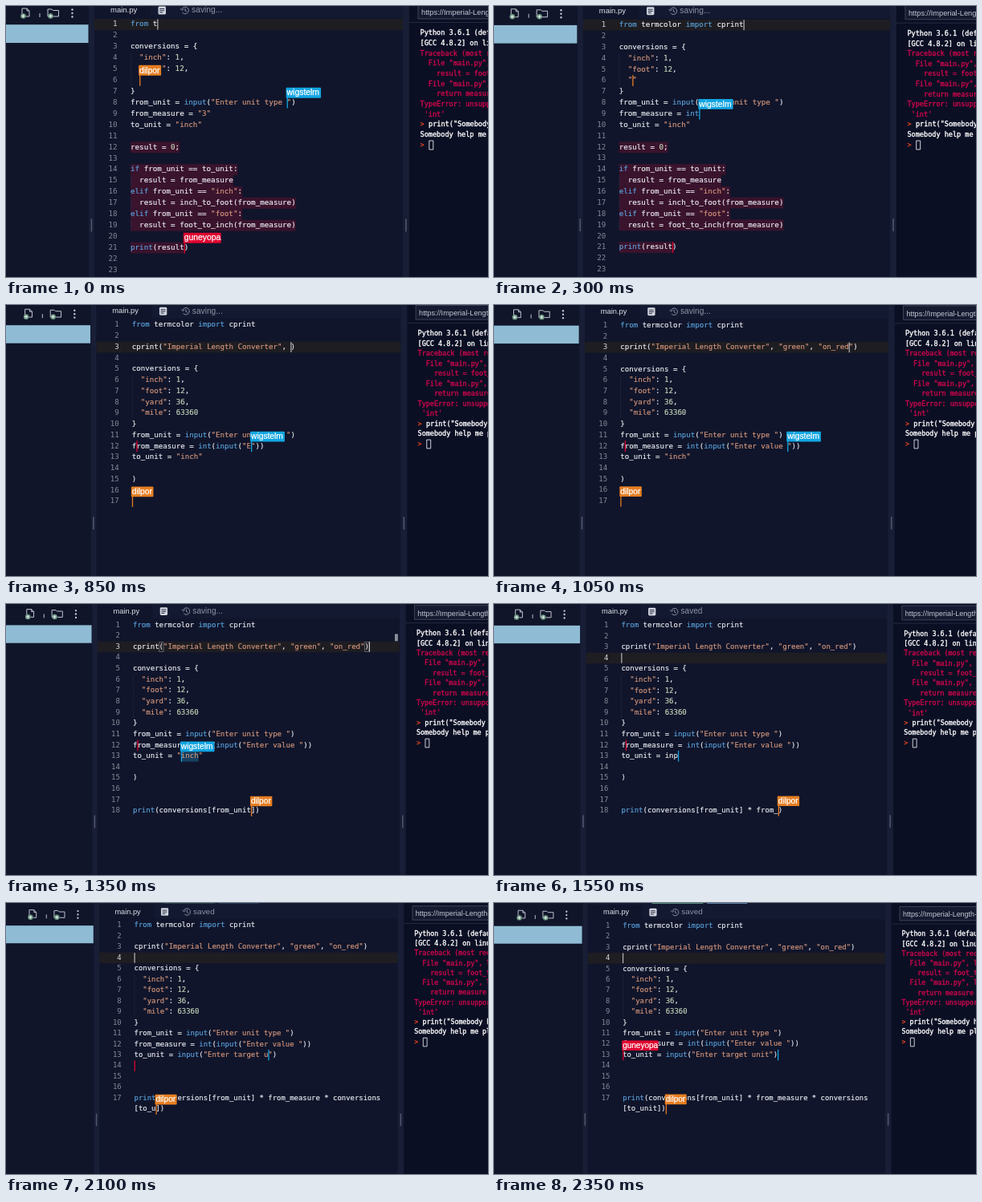
Write an HTML page with a canvas that moves like this. It is 600 px wide and 338 px high and loops after 2400 ms.

```html
<!DOCTYPE html>
<html lang="en">
<head>
<meta charset="utf-8">
<title>Shared code editor</title>
<style>
  html, body { margin: 0; width: 100%; height: 100%; overflow: hidden; background: #10152b; }
  canvas { display: block; width: 600px; height: 338px; }
</style>
</head>
<body>
<canvas id="stage" width="600" height="338"></canvas>
<script>
const ctx = document.getElementById('stage').getContext('2d');
const LOOP = 2400, STEP = 50;
const MONO = '"DejaVu Sans Mono", monospace';
const SANS = '"Liberation Sans", Arial, sans-serif';
const CODE = { x: 155, y: 23, char: 5.56, line: 13.93, left: 110, right: 494 };
const KEYWORDS = new Set(['from', 'import', 'if', 'elif', 'print', 'input', 'int']);

const COLORS = {
  editor: '#10152b', header: '#131930', panel: '#10152a', split: '#181e35',
  console: '#0b0f24', active: '#1e1d22', text: '#eceef3', dim: '#858a98',
  keyword: '#5ba3de', string: '#d6977c', number: '#c8d8bc', error: '#cf064c'
};

const GUESTS = {
  orange: { name: 'dilpor', color: '#e67e22', width: 28 },
  cyan: { name: 'wigstelm', color: '#12a5e2', width: 43.5 },
  red: { name: 'guneyopa', color: '#e0032f', width: 47 }
};

const OLD_TAIL = [
  '', 'result = 0;', '', 'if from_unit == to_unit:', '  result = from_measure',
  'elif from_unit == "inch":', '  result = inch_to_foot(from_measure)',
  'elif from_unit == "foot":', '  result = foot_to_inch(from_measure)',
  '', 'print(result)', '', ''
];

const CONSOLE = [
  'Python 3.6.1 (default, Dec', '[GCC 4.8.2] on linux', '!Traceback (most recent call',
  '!  File "main.py", line 19', '!    result = foot_to_inch', '!  File "main.py", line 11',
  '!    return measure / 12', '!TypeError: unsupported', "! 'int'",
  '> print("Somebody help me', 'Somebody help me please', '> '
];

function rect(x, y, w, h, color) {
  ctx.fillStyle = color;
  ctx.fillRect(x, y, w, h);
}

// weight thickens the letters slightly without changing their widths.
function text(str, x, y, color, font, { align = 'left', weight = 0 } = {}) {
  ctx.font = font;
  ctx.textAlign = align;
  ctx.textBaseline = 'middle';
  ctx.fillStyle = color;
  ctx.fillText(str, x, y);
  if (!weight) return;
  ctx.strokeStyle = color;
  ctx.lineWidth = weight;
  ctx.strokeText(str, x, y);
}

function stroke(color, width, trace) {
  ctx.strokeStyle = color;
  ctx.lineWidth = width;
  ctx.beginPath();
  trace();
  ctx.stroke();
}

function polyline(...points) {
  points.forEach(([x, y], i) => i ? ctx.lineTo(x, y) : ctx.moveTo(x, y));
}

// Whole-number interpolation between [time, value] pairs.
function ramp(t, ...keys) {
  if (t <= keys[0][0]) return keys[0][1];
  for (let i = 1; i < keys.length; i++) {
    const [t0, a] = keys[i - 1], [t1, b] = keys[i];
    if (t <= t1) return Math.floor(a + (b - a) * (t - t0) / (t1 - t0) + 1e-6);
  }
  return keys[keys.length - 1][1];
}

// The first n characters, with open quotes and brackets closed automatically.
function typed(str, n) {
  const pairs = { '(': ')', '[': ']', '"': '"' };
  const open = [];
  const head = str.slice(0, n);
  for (const c of head) {
    const top = open[open.length - 1];
    if (c === top) open.pop();
    else if (top !== '"' && pairs[c]) open.push(pairs[c]);
  }
  return head + open.reverse().join('');
}

const colX = col => CODE.x + col * CODE.char;
const rowY = row => CODE.y + (row - 1) * CODE.line;

function buildState(t) {
  const shift = (t >= 350) + (t >= 400);
  const k = shift + (t >= 450);
  const lines = [];
  const cursors = [];
  const marks = [];
  const put = (who, row, col, label) => cursors.push({ who, row, col, label });

  const importLen = ramp(t, [0, 6], [300, 28]);
  const titleLen = ramp(t, [400, 0], [600, 17], [1050, 52], [1100, 54]);
  lines.push('from termcolor import cprint'.slice(0, importLen));
  if (t >= 350) lines.push('');
  if (t >= 400) lines.push(typed('cprint("Imperial Length Converter", "green", "on_red")', titleLen));

  const yardLen = ramp(t, [250, 2], [300, 3], [430, 13]);
  const mileLen = ramp(t, [450, 2], [600, 15]);
  lines.push('', 'conversions = {', '  "inch": 1,', '  "foot": 12,', typed('  "yard": 36,', yardLen));
  if (t >= 450) lines.push(typed('  "mile": 63360', mileLen));
  lines.push('}', 'from_unit = input("Enter unit type ")');

  const valueLen = t < 700
    ? ramp(t, [150, 15], [300, 18], [600, 22], [700, 19])
    : ramp(t, [700, 19], [1050, 38]);
  lines.push(t < 150 ? 'from_measure = "3"'
    : typed('from_measure = int(' + (t < 700 ? '"En' : 'input("Enter value '), valueLen));

  const unitLen = ramp(t, [1450, 10], [1800, 23], [2200, 34], [2250, 36]);
  lines.push(t < 1450 ? 'to_unit = "inch"' : typed('to_unit = input("Enter target unit")', unitLen));

  if (t < 450) {
    lines.push(...OLD_TAIL);
    for (let row = 12 + k; row <= 21 + k; row++) {
      const end = row === 21 + k ? 12 : lines[row - 1].length;
      marks.push({ row, from: 0, to: end, color: 'rgba(205,15,50,.22)' });
    }
  } else {
    lines.push('', ...(t < 2050 ? [')'] : []), '', '');
  }

  const printLen = ramp(t, [1100, 0], [1350, 27], [1800, 48], [2200, 67]);
  if (t >= 1100) {
    lines.push(typed('print(conversions[from_unit] * from_measure * conversions[to_unit])', printLen));
  }

  const orangeLabel = t < 200 || t >= 450;
  const last = lines.length;
  if (t < 450) put('orange', 6 + shift, yardLen, orangeLabel);
  else if (t < 800) put('orange', 7 + shift, mileLen, orangeLabel);
  else if (printLen > 57) put('orange', last + 1, printLen - 57, true);
  else put('orange', last, printLen, true);

  const cyanLabel = t < 400 || (t >= 700 && t < 1450);
  if (t < 100) put('cyan', 8 + k, 35, true);
  else if (t >= 550 && t < 650) put('cyan', 7 + k, 1, false);
  else if (t < 1150) put('cyan', 9 + k, valueLen, cyanLabel);
  else put('cyan', 10 + k, t < 1450 ? 11 : unitLen, cyanLabel);
  if (t >= 1250 && t < 1450) {
    marks.push({ row: 10 + k, from: 11, to: 15, color: 'rgba(40,140,190,.35)' });
  }

  const redLabel = t < 200 || (t >= 500 && t < 800) || t >= 2200;
  if (t < 450) put('red', 21 + k, 12, redLabel);
  else if (t < 500) put('red', 12 + k, 0, redLabel);
  else if (t < 1950) put('red', 9 + k, 1, redLabel);
  else if (t < 2200) put('red', (t < 2050 ? 12 : 11) + k, 0, redLabel);
  else put('red', 10 + k, 0, redLabel);

  const own = t < 350 ? { row: 1, col: importLen }
    : t < 400 ? { row: 2, col: 0 }
    : t < 1500 ? { row: 3, col: titleLen }
    : { row: 4, col: 0 };
  own.visible = t < 1700 || t >= 2000;
  own.matched = t >= 1100 && t < 1500;
  return { lines, cursors, marks, own };
}

function drawCodeLine(str, row) {
  const y = rowY(row);
  if (str.startsWith('  ')) rect(CODE.x, y - CODE.line / 2, 0.6, CODE.line, '#222943');
  for (const m of str.matchAll(/"[^"]*"?|\w+|[^\w"\s]+/g)) {
    const word = m[0];
    const color = word[0] === '"' ? COLORS.string
      : /^\d/.test(word) ? COLORS.number
      : KEYWORDS.has(word) ? COLORS.keyword : COLORS.text;
    text(word, colX(m.index), y, color, '9.24px ' + MONO, { weight: 0.15 });
  }
}

function drawEditor(t) {
  const { lines, cursors, marks, own } = buildState(t);
  const half = CODE.line / 2;
  rect(CODE.left, rowY(own.row) - half, CODE.right - CODE.left, CODE.line, COLORS.active);
  for (const m of marks) {
    rect(colX(m.from), rowY(m.row) - half, (m.to - m.from) * CODE.char, CODE.line, m.color);
  }
  if (own.matched) {
    for (const col of [6, 53]) {
      stroke('#7d828c', 0.7, () => ctx.rect(colX(col), rowY(3) - 6, CODE.char, 12));
    }
    rect(488, 34.5, 4, 9, '#8a8e9b');
  }

  lines.forEach((str, i) => {
    const row = i + 1;
    const color = row === own.row ? '#d5d7de' : COLORS.dim;
    text(row, 138.6, rowY(row), color, '9.24px ' + MONO, { align: 'right' });
    drawCodeLine(str.slice(0, 57), row);
    if (str.length > 57) drawCodeLine(str.slice(57), row + 1);
  });

  if (own.visible) rect(colX(own.col), rowY(own.row) - 6.5, 1, 13, '#d5d7dc');
  for (const c of cursors) {
    rect(colX(c.col), rowY(c.row) - half, 1.3, CODE.line, GUESTS[c.who].color);
  }
  for (const c of cursors.filter(c => c.label)) {
    const guest = GUESTS[c.who], x = colX(c.col) - 1, y = rowY(c.row) - 12.3;
    ctx.fillStyle = guest.color;
    ctx.beginPath();
    ctx.roundRect(x, y - 6.5, guest.width, 13, 1);
    ctx.fill();
    text(guest.name, x + 1, y + 0.3, '#fff', '10.4px ' + SANS, { weight: 0.25 });
  }
}

function drawPlus(x, y) {
  ctx.fillStyle = '#6f9a84';
  ctx.beginPath();
  ctx.arc(x, y, 3.3, 0, 7);
  ctx.fill();
  stroke('#eef2f4', 1, () => {
    polyline([x - 2, y], [x + 2, y]);
    polyline([x, y - 2], [x, y + 2]);
  });
}

function drawSidebar() {
  rect(-40, -40, 143, 420, COLORS.panel);
  rect(-40, 23.2, 142.5, 22.8, '#8fbcd4');
  const ink = '#c3c7d1';
  stroke(ink, 1, () => {
    polyline([21, 13], [20, 13], [20, 3], [26, 3], [29, 6], [29, 13], [25, 13]);
    polyline([26, 3], [26, 6], [29, 6]);
    polyline([42, 9], [42, 14]);
    polyline([55, 13], [52, 13], [52, 4], [57, 4], [58.5, 5.5], [65.5, 5.5], [65.5, 13], [59, 13]);
  });
  drawPlus(21.5, 12.5);
  drawPlus(55.5, 12.5);
  for (const y of [4.5, 9, 13.5]) {
    ctx.fillStyle = ink;
    ctx.beginPath();
    ctx.arc(82.5, y, 1.2, 0, 7);
    ctx.fill();
  }
}

function drawHeader(t) {
  rect(CODE.left, -40, CODE.right - CODE.left, 54.5, COLORS.header);
  rect(CODE.left, -4, 70, 19, COLORS.editor);
  rect(193, -20, 66, 14.4, '#4f8f72');
  rect(264, -20, 52, 14.4, '#5b7fa8');
  text('main.py', 130, 5.5, '#dfe2ea', '9.5px ' + SANS);

  ctx.fillStyle = '#d2d5de';
  ctx.beginPath();
  ctx.roundRect(189.5, 0.5, 9.5, 10, 1.5);
  ctx.fill();
  for (const [y, w] of [[3, 6], [5.2, 6], [7.4, 4]]) rect(191.2, y, w, 1, '#252d48');

  const ink = '#8d93a6';
  stroke(ink, 1, () => {
    ctx.arc(223, 5.5, 4.3, -2.7, 2.5);
    polyline([223, 3], [223, 6], [225, 7]);
    polyline([217.2, 3.2], [219, 5.3], [221.2, 3.6]);
  });
  text(t < 1550 ? 'saving...' : 'saved', 231, 5.5, ink, '10.3px ' + SANS);
}

function drawConsole() {
  rect(502, -40, 150, 420, COLORS.console);
  rect(502, 20, 150, 0.8, '#2a3046');
  rect(513, -2, 130, 18, '#151a30');
  stroke('#4a5166', 0.8, () => ctx.rect(513, -2, 130, 18));
  text('https://Imperial-Length-Converter', 517, 8.5, '#c5c9d4', '9.3px ' + SANS);

  const font = '8.57px ' + MONO;
  const strong = { weight: 0.35 };
  CONSOLE.forEach((str, i) => {
    const y = 34 + i * 12.68;
    if (str[0] === '!') {
      text(str.slice(1), 515.5, y, COLORS.error, font, strong);
    } else if (str[0] === '>') {
      text('>', 515.5, y, '#f0481f', 'bold ' + font);
      text(str.slice(2), 526, y, '#fff', font, strong);
    } else {
      text(str, 515.5, y, '#fff', font, strong);
    }
  });
  stroke('#e8e9ee', 0.9, () => ctx.rect(526.8, 168, 5, 11));
}

function drawSplitters() {
  rect(103, -40, 7, 420, COLORS.split);
  rect(494, -40, 8, 420, COLORS.split);
  for (const x of [105.6, 497.2]) rect(x, 265.5, 1.6, 16, '#50566c');
}

function render(t) {
  const zoom = 1 - 0.0365 * t / 2350;
  ctx.setTransform(1, 0, 0, 1, 0, 0);
  rect(0, 0, 600, 338, COLORS.editor);
  ctx.translate(296, 175);
  ctx.scale(zoom, zoom);
  ctx.translate(-296, -175);
  drawEditor(t);
  drawHeader(t);
  drawSidebar();
  drawConsole();
  drawSplitters();
}

const start = performance.now();
function tick() {
  const elapsed = (performance.now() - start) % LOOP;
  render(Math.floor(elapsed / STEP) * STEP);
  requestAnimationFrame(tick);
}
tick();
</script>
</body>
</html>
```
